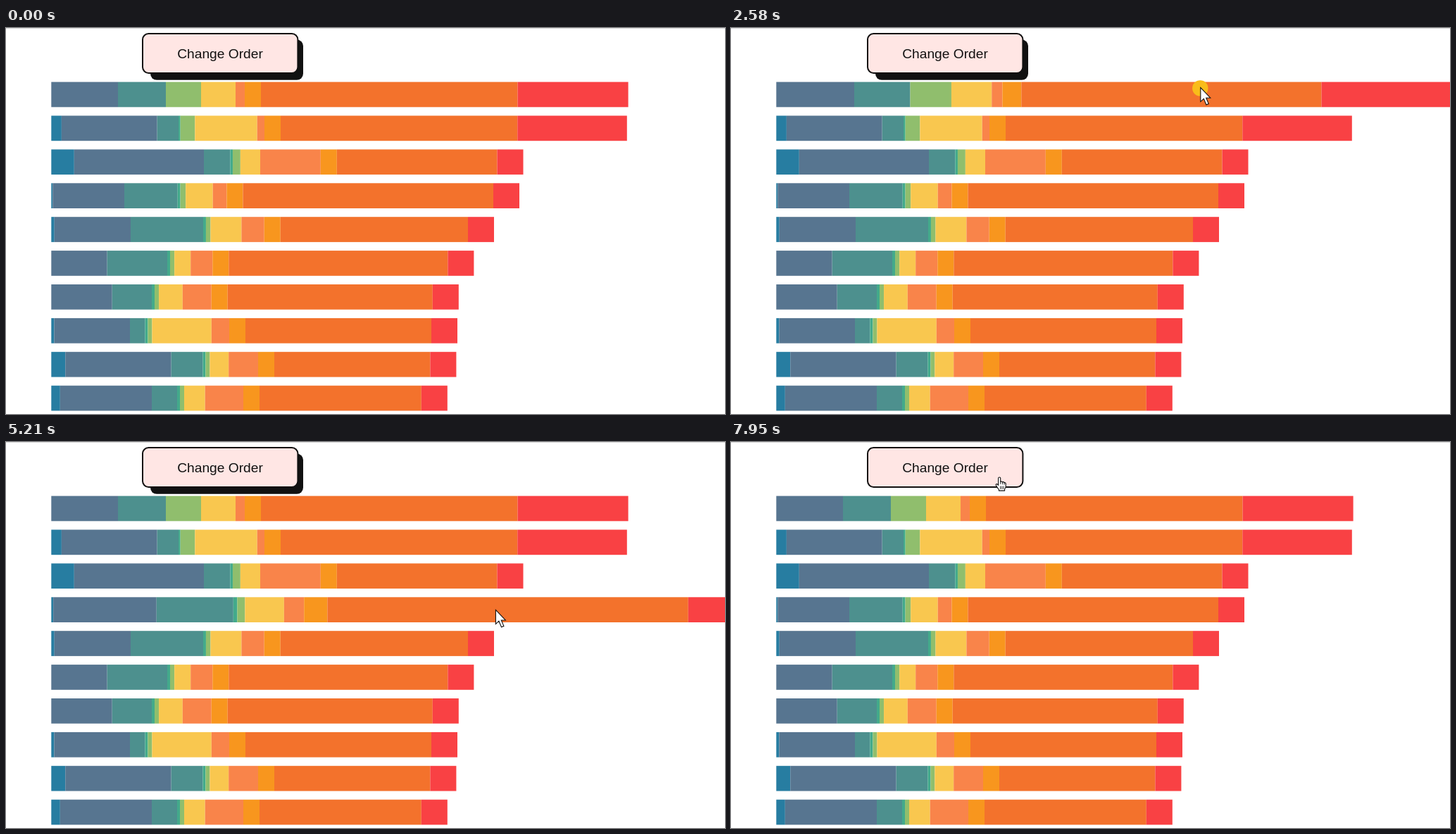
Write an HTML page that moves like this. It is 1021x548 px and loops after 8 s.

```html
<!DOCTYPE html>
<html lang="en">
<head>
<meta charset="utf-8">
<title>Stacked bars</title>
<style>
  html, body { margin: 0; width: 100%; height: 100%; overflow: hidden; background: #fff; }
  svg { display: block; width: 1021px; height: 548px; }
  text { font: 19.2px "Liberation Sans", Arial, sans-serif; fill: #111; text-anchor: middle; }
</style>
</head>
<body>
<svg viewBox="0 0 1021 548">
  <rect width="1021" height="1" fill="#d9d9d9"/>
  <rect id="shadow" rx="9" fill="#111"/>
  <rect x="194" y="8" width="220.4" height="56" rx="8.5" fill="#ffe6e4" stroke="#111" stroke-width="2"/>
  <text x="304" y="42.5">Change Order</text>
  <g id="rows"></g>
  <g id="icon">
    <rect x="666.5" y="47" width="28.5" height="28.8" rx="5" fill="#f67777"/>
    <path d="M685 65.5L690 70.5" stroke="#fff" stroke-width="2" stroke-linecap="round"/>
    <circle cx="680" cy="60.5" r="6.6" fill="none" stroke="#fff" stroke-width="1.8"/>
  </g>
  <circle id="click" fill="#f9bc1a"/>
  <path id="arrow" d="M.5 .7V20.6L5 16.4L8.6 25L12 23.6L8.4 15.2H14.4Z" fill="#fff" stroke="#111" stroke-width="1.1"/>
  <g id="hand" fill="#fff" stroke="#111" stroke-width="1.1" stroke-linejoin="round" stroke-linecap="round">
    <path d="M-1.6 11V2Q-1.6 .5 0 .5Q1.5 .5 1.5 2V7Q3.2 5.9 4.2 7.4Q6 6.6 6.8 8.2Q9 7.8 9 10V13.5Q9 15.5 7.4 17.5V19.6H-.8V18Q-2.4 16.2-4.6 12.6Q-5.6 10.8-4.4 10.2Q-3 9.6-1.6 12Z"/>
    <path d="M1.5 7V10M4.2 7.6V10.4M6.8 8.4V10.8M1.4 13.5V17M3.6 13.5V17M5.8 13.5V17" fill="none" stroke-width=".9"/>
  </g>
</svg>
<script>
const LOOP = 8000, LEFT = 64.3, FULL = 957.8, ZOOM = 970, HOVER = 7530;
const colors = ['#277da1', '#577590', '#4d908e', '#43aa8b', '#90be6d',
                '#f9c74f', '#f9844a', '#f8961e', '#f3722c', '#f94144'];

// Key points of each row: ends of slate, teal, yellow, amber and of the whole bar
const keys = [
  [159, 227, 326, 362, 883.6], [214.6, 245, 356.7, 390, 881.8],
  [281, 318.4, 361, 469.8, 734.5], [168, 243.7, 293.7, 336.4, 729],
  [177, 280, 334.4, 389.7, 693], [143.6, 229, 262.2, 316.3, 664.4],
  [150.7, 207, 250.8, 314.7, 642.8], [176, 197.4, 291.8, 340, 641],
  [234.6, 279.4, 316.2, 381, 639.4], [207, 243, 282.7, 360, 626.8]
];

// Clicks toggle a row on release: press, release, row
const clicks = [[1220, 1325, 0], [2440, 2705, 0], [3950, 4234, 3], [5650, 5910, 3]];

// Pointer moves: start, end, x, y
const entry = [908, 546];
const moves = [
  [200, 560, 524, 300], [560, 1000, 621.3, 97], [1500, 1980, 666.3, 84],
  [3500, 3690, 645.3, 195.3], [3720, 3900, 645.3, 223],
  [4720, 5390, 699, 239], [6700, 7560, 381.2, 49.5]
];

const $ = id => document.getElementById(id);
const clamp = v => Math.min(1, Math.max(0, v));
const mix = (a, b, k) => a + (b - a) * k;
const cubicInOut = k => k < .5 ? 4 * k ** 3 : 1 - 4 * (1 - k) ** 3;
const ease = (t, from, to) => cubicInOut(clamp((t - from) / (to - from)));
const show = (el, on) => el.setAttribute('visibility', on ? 'visible' : 'hidden');

function set(el, attrs) {
  for (const name in attrs) el.setAttribute(name, attrs[name]);
}

function add(parent, tag, attrs) {
  const el = document.createElementNS('http://www.w3.org/2000/svg', tag);
  set(el, attrs);
  return parent.appendChild(el);
}

// The thin segments follow from the key points and the rank of the row
function edgesOf([slate, teal, yellow, amber, end], rank) {
  const fade = 3 ** -rank;
  const blue = LEFT + Math.max(0, .27 * (slate - LEFT) - 26);
  const green = teal + 4 * (1 - fade);
  const lime = green + 6 + 44 * fade;
  const salmon = amber - Math.min(23, .8 * (amber - yellow));
  const orange = end - 37 - .86 * Math.max(0, end - 744);
  return [blue, slate, teal, green, lime, yellow, salmon, amber, orange, end];
}

const rows = keys.map((key, i) => {
  const row = add($('rows'), 'g', {});
  let from = LEFT;
  edgesOf(key, i).forEach((end, j) => {
    add(row, 'rect', {
      x: from - LEFT, y: 76.6 + 47.9 * i, width: end - from, height: 35.7, fill: colors[j]
    });
    from = end;
  });
  return row;
});

function pointerAt(t) {
  let [x, y] = entry;
  for (const [from, to, nx, ny] of moves) {
    const k = ease(t, from, to);
    x = mix(x, nx, k);
    y = mix(y, ny, k);
  }
  return [x, y];
}

function drawRows(t) {
  rows.forEach((row, i) => {
    let open = 0, target = 1;
    for (const [, release, hit] of clicks) {
      if (hit !== i) continue;
      open = mix(open, target, ease(t, release, release + ZOOM));
      target = 1 - target;
    }
    const scale = mix(1, FULL / (keys[i][4] - LEFT), open);
    row.setAttribute('transform', `translate(${LEFT} 0) scale(${scale} 1)`);
  });
}

function drawShadow(t) {
  const k = clamp((t - HOVER) / 230);
  set($('shadow'), {
    x: mix(205, 195, k), y: mix(16.5, 9, k),
    width: mix(217, 218, k), height: mix(57.3, 54, k)
  });
}

function drawPointer(t) {
  const [x, y] = pointerAt(t);
  for (const id of ['arrow', 'hand']) $(id).setAttribute('transform', `translate(${x} ${y})`);
  show($('arrow'), t >= moves[0][0] && t < HOVER);
  show($('hand'), t >= HOVER);

  const hit = clicks.find(([press, release]) => t >= press && t < release);
  show($('click'), hit);
  if (hit) set($('click'), { cx: x, cy: y + 1.5, r: mix(5, 11.2, clamp((t - hit[0]) / 130)) });
}

const start = performance.now();
function frame() {
  const t = (performance.now() - start) % LOOP;
  drawRows(t);
  drawShadow(t);
  drawPointer(t);
  show($('icon'), t >= 2790 && t < 3950);
  requestAnimationFrame(frame);
}
frame();
</script>
</body>
</html>
```
